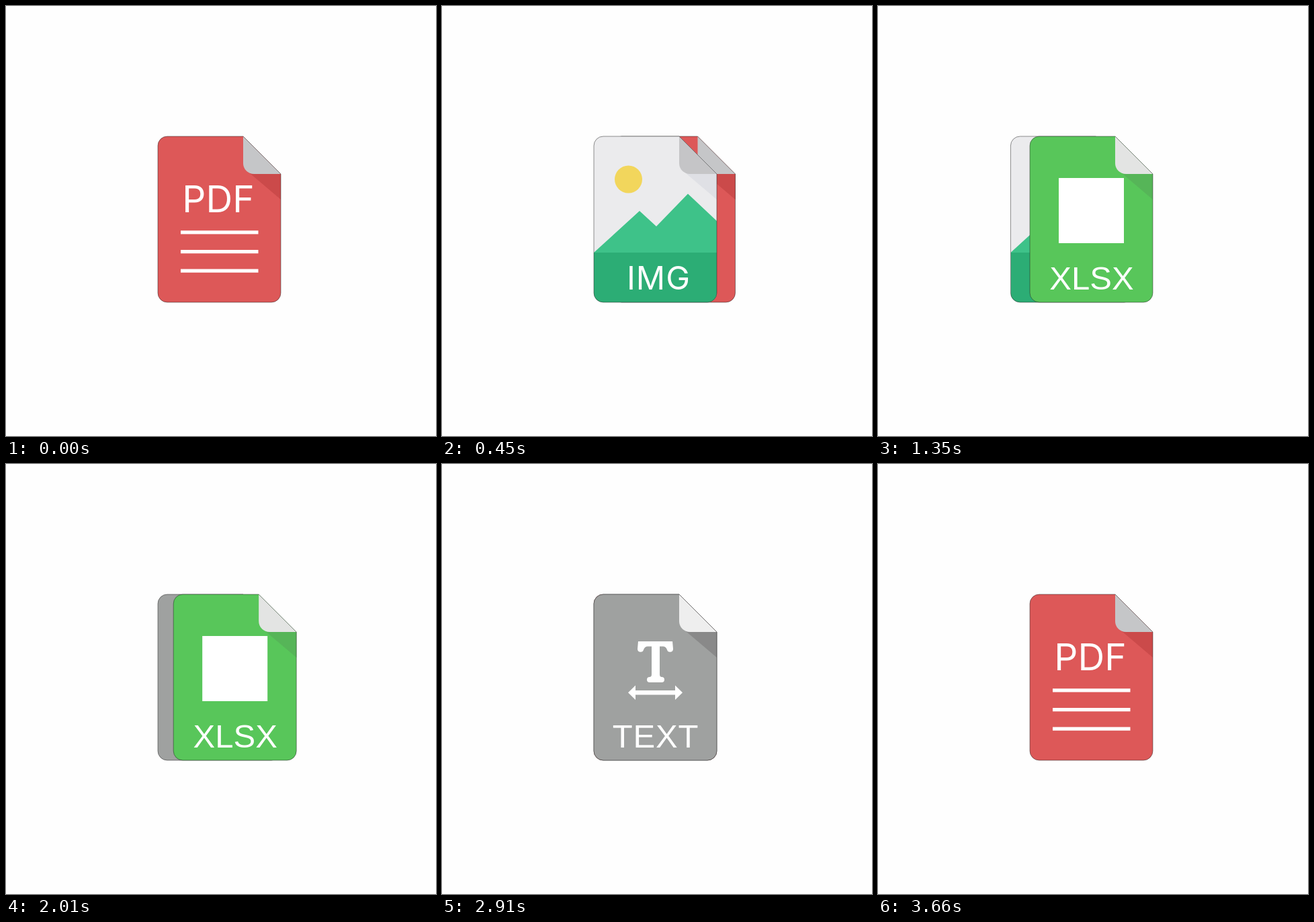
An HTML page for the animation above (3720 ms loop, 640x640 px).

```html
<!DOCTYPE html>
<html lang="en">
<head>
<meta charset="utf-8">
<title>File formats</title>
<style>
  html, body { margin: 0; width: 100%; height: 100%; overflow: hidden; background: #fefefe; }
  svg { display: block; width: 100%; height: 100%; }
  text { fill: #fff; text-anchor: middle; }
  .inter { font-family: Inter, sans-serif; }
  .arial { font-family: "Liberation Sans", Arial, sans-serif; }
  .white { fill: #fff; }
</style>
</head>
<body>
<svg viewBox="0 0 640 640">
  <defs>
    <path id="page" d="M240 194H353L409 250V427a14 14 0 0 1-14 14H240a14 14 0 0 1-14-14V208a14 14 0 0 1 14-14Z"/>
    <path id="fold" d="M353 194L409 250H369a16 16 0 0 1-16-16Z"/>
    <path id="shade" d="M363 249L409 288V250Z"/>
    <clipPath id="clip"><use href="#page"/></clipPath>
  </defs>
</svg>
<script>
const svg = document.querySelector('svg');
const STEP = 30, LOOP = 3720, PEAK = 6.9, END = 14.1;

const sheets = [
  ['#dd5858', '#cb4a4a', '#c5c6c8', `
    <text class="inter" x="316" y="307" font-size="55">PDF</text>
    <path class="white" d="M260 334.2h115.5v5.2H260ZM260 363h115.5v5.2H260ZM260 391.6h115.5v5.2H260Z"/>`],
  ['#ebebed', '#dfe0e5', '#c5c5c7', `
    <circle cx="277.5" cy="258" r="20.5" fill="#f2d65c"/>
    <path d="M226 367L294 305L319 328L366 279.500L409 320V367Z" fill="#3ec289"/>
    <path d="M226 367H409V441H226Z" fill="#2cad75"/>
    <text class="inter" x="322.5" y="422" font-size="48" letter-spacing="1">IMG</text>`],
  ['#58c65a', '#56b558', '#e3e4e3', `
    <rect class="white" x="269" y="256" width="97" height="97"/>
    <text class="arial" x="318" y="421.500" font-size="49">XLSX</text>`],
  ['#9fa1a0', '#898989', '#eeeeee', `
    <path class="white" d="M292 264H343L344 275a4.600 4.600 0 0 1-9 1.500Q333 271 328 271.500H324V313q0 4 3 4a4 4 0 0 1 0 8H309a4 4 0 0 1 0-8q3 0 3-4V271.500H307Q302 271 300 276.500a4.600 4.600 0 0 1-9-1.500Z"/>
    <path class="white" d="M277 340.300L288 329.500V337H347V329.500L358 340.300L347 351V343.600H288V351Z"/>
    <text class="arial" x="318" y="421.500" font-size="49" letter-spacing=".8">TEXT</text>`]
].map(([page, shade, fold, art]) => {
  const g = document.createElementNS(svg.namespaceURI, 'g');
  g.innerHTML = `<use href="#page" fill="${page}"/>
    <g clip-path="url(#clip)">${art}</g>
    <use href="#shade" fill="${shade}"/><use href="#fold" fill="${fold}"/>
    <use href="#page" fill="none" stroke="#222" stroke-width=".5"/>`;
  svg.append(g);
  return g;
});

// start time, travel, step at which the next sheet appears behind
const swaps = [[120, 201, 1], [1020, -209, 2], [1980, 201, 0], [2910, -209, 0]];

// cubic-bezier(.25, .1, .25, 1)
function ease(x) {
  if (x <= 0) return 0;
  if (x >= 1) return 1;
  let lo = 0, hi = 1, u;
  for (let i = 0; i < 24; i++) {
    u = (lo + hi) / 2;
    if (.75 * u * (1 - u) + u ** 3 < x) lo = u; else hi = u;
  }
  return .3 * u * (1 - u) ** 2 + 3 * u * u * (1 - u) + u ** 3;
}

function place(sheet, x, visible) {
  sheet.setAttribute('transform', `translate(${x})`);
  sheet.style.display = visible ? '' : 'none';
}

function draw(now) {
  const t = Math.floor(now % LOOP / STEP) * STEP;
  const n = Math.max(0, swaps.findLastIndex(([start]) => t >= start));
  const [start, travel, show] = swaps[n];
  const k = (t - start) / STEP;
  const old = sheets[n], next = sheets[(n + 1) % 4];
  const out = k < PEAK;
  const shift = out ? ease((k - .25) / (PEAK - .25)) : 1 - ease((k - PEAK) / (END - PEAK));

  sheets.forEach(s => place(s, 0, false));
  place(old, travel * shift, k < END);
  place(next, 0, k >= show);
  const front = out ? old : next;
  if (svg.lastElementChild !== front) svg.append(front);
  requestAnimationFrame(draw);
}
requestAnimationFrame(draw);
</script>
</body>
</html>
```
